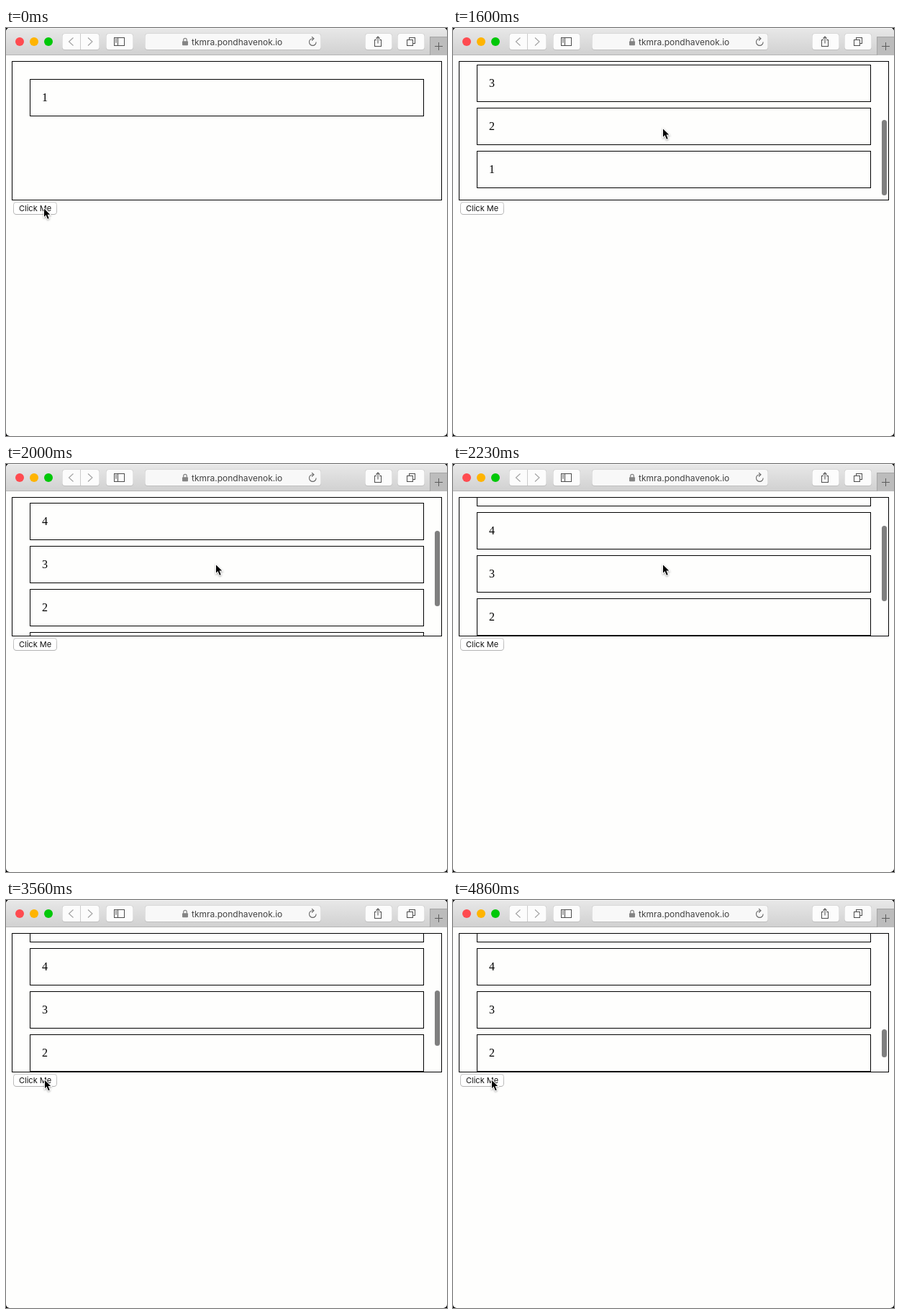
These frames come from a looping animation (613 px wide and 568 px high, 5360 ms). An HTML page with a canvas:

```html
<!DOCTYPE html>
<html lang="en">
<head>
<meta charset="utf-8">
<title>Prepending list</title>
<style>
  html, body { margin: 0; width: 100%; height: 100%; overflow: hidden; background: #000; }
  canvas { display: block; width: 613px; height: 568px; }
</style>
</head>
<body>
<canvas id="stage"></canvas>
<script>
const W = 613, H = 568, LOOP = 5360;
const canvas = document.getElementById('stage');
const ctx = canvas.getContext('2d');
const dpr = window.devicePixelRatio || 1;
canvas.width = W * dpr;
canvas.height = H * dpr;

const UI_FONT = 'Inter, Roboto, sans-serif';
const INK = '#4c4c4c';
const VIEW = { x: 9, y: 47, w: 596, h: 192 };
const ROW = { x: 33, w: 548, h: 52, pitch: 60, first: 71 };

// Evenly spaced clicks; each release prepends one row.
const HOLD = 60;
const BURSTS = [
  { start: 130, period: 240, clicks: 4 },
  { start: 3200, period: 200, clicks: 9 }
];

const HOME = { x: 53, y: 251.5 };
const MOVES = [
  { start: 1200, count: 5, x: 292, y: 140.4 },
  { start: 2530, count: 17, x: 55, y: 247.9 },
  { start: 3100, count: 3, x: 54, y: 250.9 }
];

const clamp = (v, lo, hi) => Math.max(lo, Math.min(hi, v));
const smooth = u => u * u * (3 - 2 * u);

// Number of 30 fps ticks passed since start.
const ticks = (t, start, count) => clamp(Math.floor((t - start + 8) / 33.4) + 1, 0, count);

function rowCount(t) {
  return BURSTS.reduce((n, b) =>
    n + clamp(Math.floor((t - b.start - HOLD) / b.period) + 1, 0, b.clicks), 1);
}

function isPressed(t) {
  return BURSTS.some(b => {
    const since = t - b.start;
    return since >= 0 && since < b.period * b.clicks && since % b.period < HOLD;
  });
}

function pointerAt(t) {
  let { x, y } = HOME;
  for (const m of MOVES) {
    const u = smooth(ticks(t, m.start, m.count) / m.count);
    x += (m.x - x) * u;
    y += (m.y - y) * u;
  }
  return [x, y];
}

// Distance scrolled up from the bottom, easing out to a slow drift.
function scrolledUp(t) {
  const k = ticks(t, 1600, 20);
  return Math.round(k + 64 * (1 - Math.pow(1 - k / 20, 2.22)));
}

function gradient(y0, y1, from, to) {
  const g = ctx.createLinearGradient(0, y0, 0, y1);
  g.addColorStop(0, from);
  g.addColorStop(1, to);
  return g;
}

function rect(x, y, w, h, color) {
  ctx.fillStyle = color;
  ctx.fillRect(x, y, w, h);
}

function roundRect(x, y, w, h, r, color) {
  ctx.beginPath();
  ctx.roundRect(x, y, w, h, r);
  ctx.fillStyle = color;
  ctx.fill();
}

// One pixel outline lying inside the given box.
function frame(x, y, w, h, color = '#000') {
  ctx.strokeStyle = color;
  ctx.lineWidth = 1;
  ctx.strokeRect(x + 0.5, y + 0.5, w - 1, h - 1);
}

function text(str, x, y, font, color) {
  ctx.font = font;
  ctx.fillStyle = color;
  ctx.fillText(str, x, y);
}

// Two equal strokes meeting at the tip, opening by (dx, dy) either way.
function chevron(x, y, dx, dy, vertical, color) {
  ctx.strokeStyle = color;
  ctx.lineWidth = 1.1;
  ctx.beginPath();
  ctx.moveTo(x + dx, y + dy);
  ctx.lineTo(x, y);
  if (vertical) ctx.lineTo(x - dx, y + dy);
  else ctx.lineTo(x + dx, y - dy);
  ctx.stroke();
}

function toolButton(x, w, fill = '#fcfcfc') {
  roundRect(x, 8, w, 23, 4, '#bebebe');
  roundRect(x, 7.5, w, 22.5, 4, '#d0d0d0');
  roundRect(x + 0.6, 8, w - 1.2, 22, 3.5, fill);
}

function drawLock(x, y) {
  const color = '#858585';
  ctx.strokeStyle = color;
  ctx.lineWidth = 1.2;
  ctx.beginPath();
  ctx.roundRect(x + 1.7, y, 4.6, 8, 2.3);
  ctx.stroke();
  roundRect(x, y + 4, 8, 6, 1, color);
}

function drawToolbar() {
  rect(0, 0, W, 38, gradient(0, 37, '#e8e8e8', '#d1d1d1'));
  rect(0, 0, W, 1, '#f5f5f5');
  rect(0, 37, W, 1, '#b5b5b5');

  ['#ff4b50', '#ffb400', '#00c808'].forEach((color, i) =>
    roundRect(13 + 20 * i, 13, 12, 12, 6, color));

  // Back and forward
  toolButton(78, 52);
  rect(103, 8, 1, 22, '#cbcbcb');
  chevron(87.5, 19, 6, 5.5, false, '#a2a2a2');
  chevron(120, 19, -6, 5.5, false, '#a2a2a2');

  // Sidebar
  toolButton(139, 38);
  frame(150, 13, 15, 12, INK);
  rect(155, 13, 1, 12, INK);
  for (let i = 0; i < 3; i++) rect(152, 15 + 2 * i, 2, 1, INK);

  // Address field
  toolButton(193, 245, '#f8f8f8');
  drawLock(245, 14.3);
  text('tkmra.pondhavenok.io', 258, 23.5, '12px ' + UI_FONT, '#424242');
  ctx.strokeStyle = '#666';
  ctx.lineWidth = 1.1;
  ctx.beginPath();
  ctx.arc(426.3, 19.6, 4.8, 0, Math.PI * 1.55);
  ctx.stroke();
  chevron(428, 14.8, -3, 2.7, false, '#666');

  // Share
  toolButton(499, 38);
  frame(512, 16, 10, 10, INK);
  rect(515, 16, 4, 1, '#fcfcfc');
  rect(516.5, 12.5, 1, 9, INK);
  chevron(517, 12, 2.7, 2.8, true, INK);

  // Tab overview
  toolButton(544, 38);
  frame(560, 13, 9, 9, INK);
  rect(557, 16, 9, 9, '#fcfcfc');
  frame(557, 16, 9, 9, INK);

  // New tab
  rect(589, 12, 24, 26, '#a5a5a5');
  rect(590, 13, 23, 25, '#bcbcbc');
  rect(596, 25, 11, 1, '#5c5c5c');
  rect(601, 20, 1, 11, '#5c5c5c');
}

function drawList(count, up) {
  const content = count * ROW.pitch + 40;
  const overflow = content > VIEW.h;
  const top = overflow ? content - VIEW.h - up : 0;

  ctx.save();
  ctx.beginPath();
  ctx.rect(VIEW.x, VIEW.y, VIEW.w, VIEW.h);
  ctx.clip();
  for (let i = 1; i <= count; i++) {
    const y = ROW.first + (count - i) * ROW.pitch - top;
    frame(ROW.x, y, ROW.w, ROW.h);
    text(i, 50, y + 31, '16px "Liberation Serif", serif', '#000');
  }
  ctx.restore();
  frame(VIEW.x - 1, VIEW.y - 1, VIEW.w + 2, VIEW.h + 2);

  if (overflow) {
    const end = 50 + 187 * (top + VIEW.h) / content;
    const size = 189 * VIEW.h / content - 1.7;
    const y = Math.round(end - size);
    roundRect(596, y, 7, Math.round(end) - y, 3.5, '#7f7f7f');
  }
}

function drawButton(pressed) {
  const edge = pressed ? gradient(242, 260, '#4a9af6', '#0b50d0')
                       : gradient(242, 260, '#cdcdcd', '#b2b2b2');
  const face = pressed ? gradient(242, 260, '#64aefb', '#0f68f2') : '#fff';
  roundRect(10, 242, 61, 18, 4.5, edge);
  roundRect(11, 243, 59, 16, 3.5, face);
  text('Click Me', 18, 255, '11px ' + UI_FONT, pressed ? '#fff' : '#111');
}

const ARROW = new Path2D('M0 0V11.2L3.2 8.2H8.2Z');
const TAIL = new Path2D('M2.8 6.6L5.4 13');

function drawPointer(x, y) {
  ctx.save();
  ctx.translate(x, y);
  ctx.lineCap = 'square';

  ctx.save();
  ctx.shadowColor = 'rgba(0,0,0,0.35)';
  ctx.shadowBlur = 2.5 * dpr;
  ctx.shadowOffsetY = dpr;
  ctx.strokeStyle = '#fff';
  ctx.lineWidth = 2;
  ctx.stroke(ARROW);
  ctx.lineWidth = 4;
  ctx.stroke(TAIL);
  ctx.restore();

  ctx.fillStyle = ctx.strokeStyle = '#000';
  ctx.lineWidth = 2;
  ctx.fill(ARROW);
  ctx.stroke(TAIL);
  ctx.restore();
}

function draw(t) {
  ctx.setTransform(dpr, 0, 0, dpr, 0, 0);
  rect(0, 0, W, H, '#000');
  ctx.save();
  ctx.beginPath();
  ctx.roundRect(0, 0, W, H, 5);
  ctx.clip();
  rect(0, 0, W, H, '#fefefd');
  drawToolbar();
  drawList(rowCount(t), scrolledUp(t));
  drawButton(isPressed(t));
  drawPointer(...pointerAt(t));
  ctx.restore();
}

const begin = performance.now();
function tick() {
  const t = (performance.now() - begin) % LOOP;
  draw(Math.floor(t / 10) * 10);
  requestAnimationFrame(tick);
}
tick();
</script>
</body>
</html>
```
